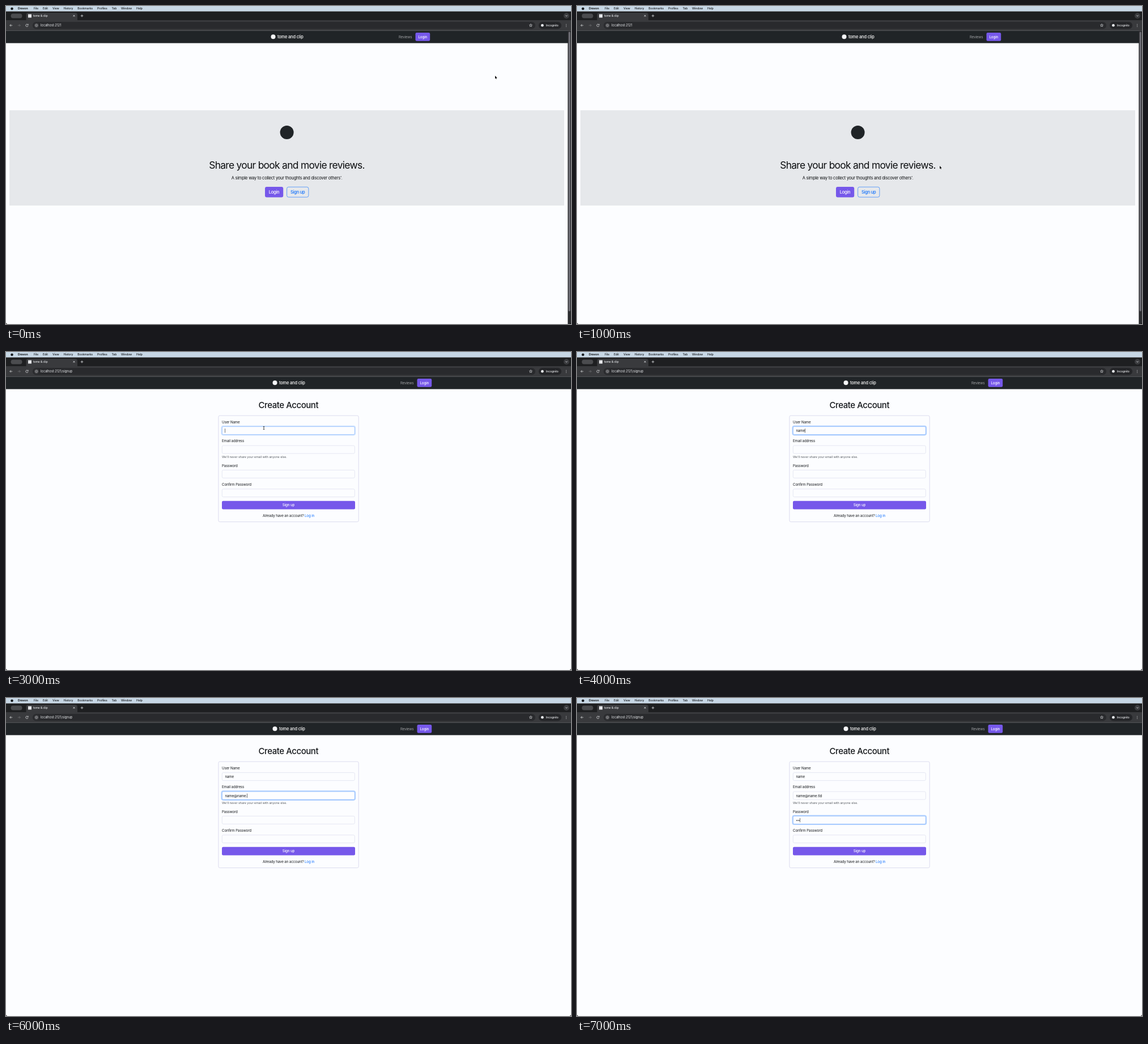
Write an HTML page with a canvas that moves like this. It is 997 px wide and 561 px high and loops after 8000 ms.

```html
<!DOCTYPE html>
<html lang="en">
<head>
<meta charset="utf-8">
<title>Sign-up walkthrough</title>
<style>
html, body { margin: 0; width: 100%; height: 100%; overflow: hidden; background: #fcfdff; }
canvas { display: block; width: 997px; height: 561px; }
</style>
</head>
<body>
<canvas id="stage"></canvas>
<script>
const W = 997, H = 561, STEP = 1000;
const canvas = document.getElementById('stage');
const ctx = canvas.getContext('2d');
const ratio = window.devicePixelRatio || 1;
canvas.width = Math.round(W * ratio);
canvas.height = Math.round(H * ratio);

const PURPLE = '#7658ea', BLUE = '#0d6efd', INK = '#15181b', NAV = '#202427', PAGE = '#fcfdff';
const USER = 'name', MAIL = 'name@name.tld';

// One entry per second of the loop.
const scenes = [
  { page: 'home', cursor: ['arrow', 863, 123] },
  { page: 'home', cursor: ['arrow', 640, 282] },
  { page: 'home', cursor: ['hand', 525, 334.5], loading: true },
  { page: 'signup', values: [], focus: 0, ring: 0.6, cursor: ['beam', 455, 134] },
  { page: 'signup', values: [USER], focus: 0 },
  { page: 'signup', values: [USER, MAIL.slice(0, 4)], focus: 1 },
  { page: 'signup', values: [USER, MAIL.slice(0, 10)], focus: 1 },
  { page: 'signup', values: [USER, MAIL, '••'], focus: 2 }
];

function rect(x, y, w, h, color) {
  ctx.fillStyle = color;
  ctx.fillRect(x, y, w, h);
}

function round(x, y, w, h, r, fill, stroke, width = 0.8) {
  ctx.beginPath();
  ctx.roundRect(x, y, w, h, r);
  if (fill) { ctx.fillStyle = fill; ctx.fill(); }
  if (stroke) { ctx.strokeStyle = stroke; ctx.lineWidth = width; ctx.stroke(); }
}

function dot(x, y, r, color) {
  ctx.beginPath();
  ctx.arc(x, y, r, 0, Math.PI * 2);
  ctx.fillStyle = color;
  ctx.fill();
}

function line(points, color, width = 0.8) {
  ctx.beginPath();
  points.forEach(([x, y], i) => i ? ctx.lineTo(x, y) : ctx.moveTo(x, y));
  ctx.strokeStyle = color;
  ctx.lineWidth = width;
  ctx.stroke();
}

function cross(x, y, r, color) {
  line([[x - r, y - r], [x + r, y + r]], color);
  line([[x + r, y - r], [x - r, y + r]], color);
}

function text(str, x, y, size, color, { weight = 400, align = 'left', track = -0.02 } = {}) {
  ctx.font = `${weight} ${size}px Inter, "Noto Sans", sans-serif`;
  ctx.letterSpacing = `${track * size}px`;
  ctx.textAlign = align;
  ctx.fillStyle = color;
  ctx.fillText(str, x, y);
  return ctx.measureText(str).width;
}

function arrowIcon(x, y, dir, color) {
  line([[x - 2.2, y], [x + 2.2, y]], color);
  line([[x + dir * 0.3, y - 2], [x + dir * 2.2, y], [x + dir * 0.3, y + 2]], color);
}

function starIcon(x, y, r) {
  const points = Array.from({ length: 11 }, (_, i) => {
    const a = -Math.PI / 2 + i * Math.PI / 5, d = i % 2 ? r * 0.45 : r;
    return [x + d * Math.cos(a), y + d * Math.sin(a)];
  });
  line(points, '#d5d6d9', 0.7);
}

function menuBar() {
  rect(0, 0, W, 9.5, '#c7d7e5');
  dot(10.5, 4.7, 2.3, '#16191d');
  text('Dravon', 21, 6.4, 5.2, '#16191d', { weight: 700 });
  const items = [['File', 49], ['Edit', 65], ['View', 82], ['History', 101.5], ['Bookmarks', 126.3],
    ['Profiles', 161], ['Tab', 186.5], ['Window', 203], ['Help', 230]];
  items.forEach(([label, x]) => text(label, x, 6.4, 5.1, '#16191d', { weight: 500 }));
}

function tabStrip(loading) {
  rect(0, 9.5, W, 16, '#1e1f21');
  round(8.5, 13.5, 20, 8, 4, '#4b4c4f');
  round(35.5, 12, 90.5, 16, [4, 4, 0, 0], '#393a3d');
  if (loading) line([[43.3, 15.4], [44.8, 16.6]], '#dfe1e5', 1);
  else rect(39, 14.5, 6, 6, '#e4e5e8');
  text('tome & clip', 48, 19.2, 5, '#e8eaed', { weight: 500 });
  cross(120, 17.3, 1.5, '#e8eaed');
  line([[131.7, 17.3], [136.3, 17.3]], '#dfe1e5');
  line([[134, 15], [134, 19.6]], '#dfe1e5');
  dot(989, 17.2, 5, '#3b3c3f');
  line([[987.3, 16.5], [989, 18.1], [990.7, 16.5]], '#dfe1e5');
}

function toolbar(path, loading) {
  rect(0, 25, W, 18.8, '#393a3d');
  arrowIcon(9, 34.2, -1, '#d5d6d9');
  arrowIcon(23, 34.2, 1, '#6d6e72');
  if (loading) cross(37, 34.2, 1.9, '#d5d6d9');
  else {
    ctx.beginPath();
    ctx.arc(37, 34.2, 2.2, 0.3, Math.PI * 1.75);
    ctx.strokeStyle = '#d5d6d9';
    ctx.lineWidth = 0.8;
    ctx.stroke();
    line([[39.2, 31.6], [39.2, 33.4], [37.4, 33.4]], '#d5d6d9');
  }
  round(47, 28, 887, 12.5, 6.25, '#292a2d');
  dot(53.7, 34.2, 4.2, '#3d3e41');
  round(51.6, 32.1, 4.2, 4.2, 2.1, null, '#d5d6d9', 0.6);
  rect(53.4, 33.6, 0.7, 1.7, '#d5d6d9');
  text('localhost:2121' + path, 61, 36.2, 5.6, '#e8eaed', { track: -0.005 });
  starIcon(926, 34.2, 2.7);
  round(940, 28, 40, 12.5, 6.25, '#242528');
  dot(946.4, 34.2, 2.4, '#e8eaed');
  text('Incognito', 953, 36, 5.1, '#e8eaed', { weight: 500 });
  [-2, 0, 2].forEach(d => dot(988.6, 34.2 + d, 0.55, '#d5d6d9'));
}

function navBar(shift) {
  rect(0, 43.8, W, 21.7, NAV);
  dot(471.5 + shift, 54.3, 4, '#f4f5f7');
  text('tome and clip', 479 + shift, 57.2, 7.4, '#ffffff', { weight: 500 });
  text('Reviews', 693 + shift, 56.7, 6.2, '#a0a2a5');
  round(722.5 + shift, 47, 25.7, 14.7, 2.3, PURPLE);
  text('Login', 735.3 + shift, 56.5, 6.2, '#ffffff', { weight: 500, align: 'center' });
}

function homePage(hover) {
  rect(6, 184, 979, 168, '#e6e8eb');
  dot(495.6, 223, 12, NAV);
  const centre = { align: 'center', track: -0.03 };
  text('Share your book and movie reviews.', 495.5, 287, 17.4, '#0c0e10', { ...centre, track: -0.04 });
  text("A simple way to collect your thoughts and discover others'.", 495.5, 306, 7.5, '#0c0e10', centre);
  round(457, 319, 32.2, 18.5, 3, PURPLE);
  text('Login', 473, 330.8, 7.5, '#ffffff', { ...centre, weight: 500 });
  round(495.6, 319.3, 38.3, 17.9, 3, hover ? BLUE : null, BLUE, 0.6);
  text('Sign up', 514.7, 330.8, 7.5, hover ? '#ffffff' : BLUE, { ...centre, weight: 500 });
  rect(991.3, 43.8, 5.7, H - 43.8, '#2b2c2f');
  round(992.7, 45.5, 3, 493, 1.5, '#707078');
}

function field(label, top, value, focused, ring) {
  text(label, 381, top - 5.4, 6.2, INK);
  if (focused) round(380.7, top - 0.3, 235.2, 15.2, 2.6, null, `rgba(13,110,253,${0.3 * ring})`, 2.4);
  round(381.3, top + 0.3, 234, 14, 2.2, PAGE, focused ? '#86b7fe' : '#dcdfec', 0.7);
  const width = text(value, 386.4, top + 9.7, 6.2, INK);
  if (focused) rect(386.3 + width, top + 3.8, 0.6, 7.4, INK);
}

function signupPage({ values, focus, ring = 1 }) {
  text('Create Account', 498.3, 99.3, 15, INK, { weight: 500, align: 'center', track: -0.03 });
  round(374.9, 112.2, 247.3, 187.4, 2.5, null, '#d3d4ea', 0.8);
  const fields = [['User Name', 131.3], ['Email address', 164.8], ['Password', 208], ['Confirm Password', 241.4]];
  fields.forEach(([label, top], i) => field(label, top, values[i] || '', i === focus, ring));
  text("We'll never share your email with anyone else.", 381, 187.3, 5.45, '#5a5e63', { track: -0.015 });
  round(381, 262.8, 235, 14.8, 2.3, PURPLE);
  text('Sign up', 498.5, 272.3, 6.2, '#ffffff', { weight: 500, align: 'center' });
  text('Already have an account?', 453, 290.7, 6.2, INK);
  text('Log in', 527, 290.7, 6.2, BLUE);
}

const cursors = {
  arrow() {
    ctx.beginPath();
    ctx.moveTo(0, 0);
    [[0, 5.2], [1.2, 4.2], [2, 6], [2.9, 5.6], [2.1, 3.9], [3.7, 3.8]].forEach(p => ctx.lineTo(...p));
    ctx.closePath();
    ctx.strokeStyle = '#ffffff';
    ctx.lineWidth = 0.9;
    ctx.stroke();
    ctx.fillStyle = '#0b0b0d';
    ctx.fill();
  },
  hand() {
    round(-0.6, 0, 1.4, 4.5, 0.7, '#ffffff', '#111111', 0.7);
    round(-1.5, 2.5, 4.2, 3.9, 1.4, '#ffffff', '#111111', 0.7);
    rect(-0.25, 1, 0.7, 3, '#ffffff');
  },
  beam() {
    rect(-0.4, -2.6, 0.8, 5.2, '#15181b');
    rect(-1.3, -3, 2.6, 0.7, '#15181b');
    rect(-1.3, 2.4, 2.6, 0.7, '#15181b');
  }
};

function drawCursor([kind, x, y]) {
  ctx.save();
  ctx.translate(x, y);
  cursors[kind]();
  ctx.restore();
}

function statusBubble() {
  round(0, 552.5, 53, 8.5, [0, 2, 0, 0], '#28292c');
  text('localhost:2121/signup', 2, 558.6, 4.75, '#d0d1d5', { track: -0.01 });
}

function windowCorners() {
  ctx.beginPath();
  ctx.rect(0, H - 3, W, 3);
  ctx.roundRect(0, H - 12, W, 12, [0, 0, 3, 3]);
  ctx.save();
  ctx.clip('evenodd');
  rect(0, H - 3, W, 3, '#0b0b0d');
  ctx.restore();
}

function draw(now) {
  const scene = scenes[Math.floor(now / STEP) % scenes.length];
  const home = scene.page === 'home';
  ctx.setTransform(canvas.width / W, 0, 0, canvas.height / H, 0, 0);
  rect(0, 0, W, H, PAGE);
  menuBar();
  tabStrip(scene.loading);
  toolbar(home ? '' : '/signup', scene.loading);
  navBar(home ? 0 : 3);
  if (home) homePage(scene.loading);
  else signupPage(scene);
  windowCorners();
  if (scene.loading) statusBubble();
  if (scene.cursor) drawCursor(scene.cursor);
}

let start;
function tick(now) {
  start ??= now;
  draw(now - start);
  requestAnimationFrame(tick);
}
draw(0);
requestAnimationFrame(tick);
</script>
</body>
</html>
```
